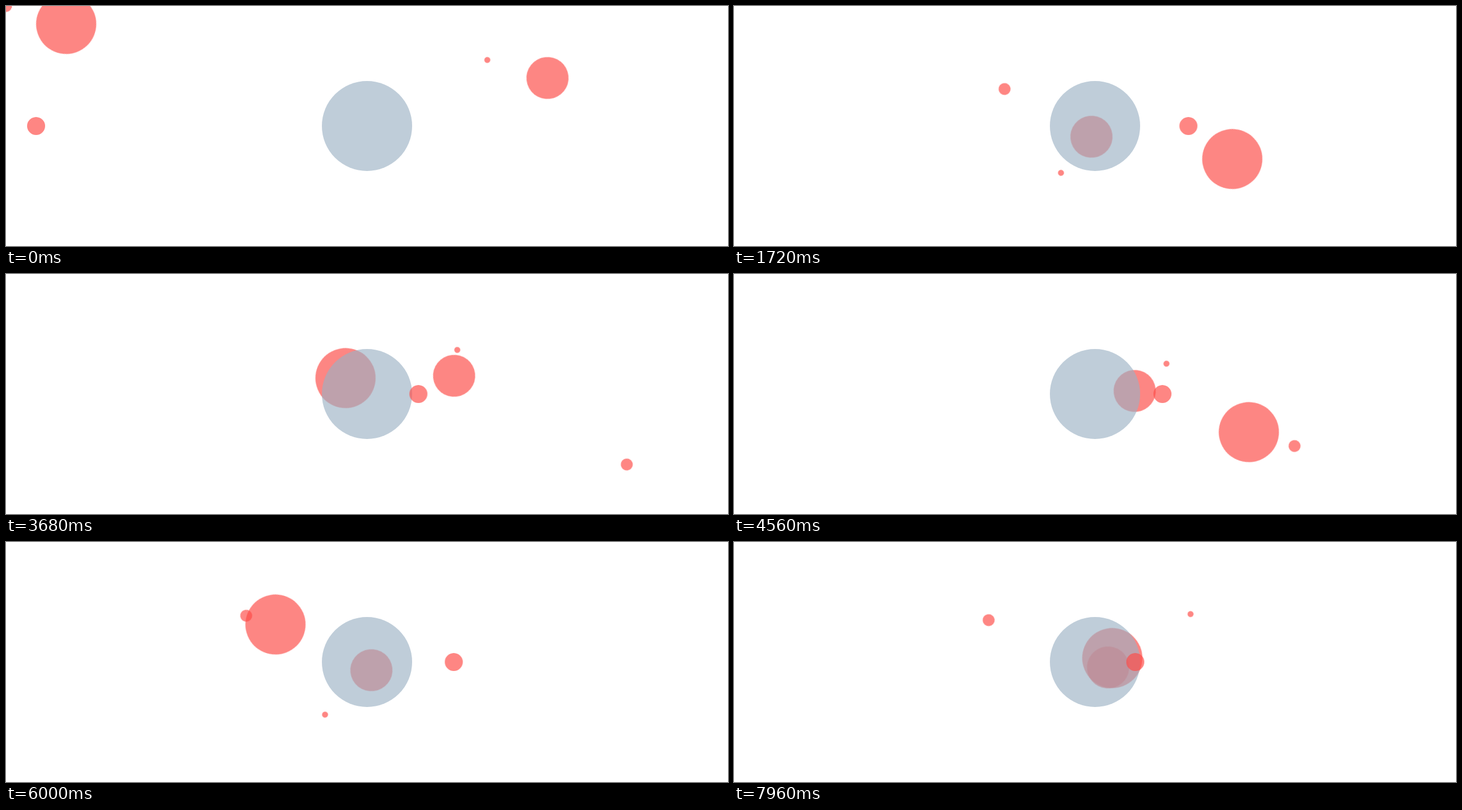
Write an HTML page without scripts that moves like this. It is 1200 by 400 pixels and loops after 8 s.

```html
<!DOCTYPE html>
<html lang="en">
<head>
<meta charset="utf-8">
<title>Attracted bubbles</title>
<style>
  html, body { margin: 0; width: 100%; height: 100%; overflow: hidden; background: #fff; }
  svg { display: block; width: 100vw; height: 100vh; }
  .hub { fill: #9ab1c3; fill-opacity: .635; }
  .ball { fill: #fd4b46; fill-opacity: .67; animation: 8s linear infinite; }
  .a { animation-name: a; }
  .b { animation-name: b; }
  .c { animation-name: c; }
  .d { animation-name: d; }
  .e { animation-name: e; }

  /* Distance from the attractor: speed up to a limit, coast, then swing.
     The curves are parabolas: (.3333, .6667, .6667, 1) slows to a turning
     point, (.3333, 0, .6667, .3333) speeds away from it. */
  @keyframes a {
    0% { transform: translateX(575.67px); animation-timing-function: cubic-bezier(.3333, .0196, .6667, .3529); }
    8% { transform: translateX(371.67px); }
    15.5% { transform: translateX(-3.33px); animation-timing-function: cubic-bezier(.3333, .6667, .6667, 1); }
    23.5833% { transform: translateX(-199.35px); animation-timing-function: cubic-bezier(.3333, 0, .6667, .3333); }
    32% { transform: translateX(13.17px); animation-timing-function: cubic-bezier(.3333, .6667, .6667, 1); }
    39.9167% { transform: translateX(201.19px); animation-timing-function: cubic-bezier(.3333, 0, .6667, .3333); }
    48.5%, 82.5% { transform: translateX(-19.83px); animation-timing-function: cubic-bezier(.3333, .6667, .6667, 1); }
    56.5833%, 90.5833% { transform: translateX(-215.85px); animation-timing-function: cubic-bezier(.3333, 0, .6667, .3333); }
    65%, 99% { transform: translateX(-3.33px); }
    65.5% { transform: translateX(21.67px); animation-timing-function: cubic-bezier(.3333, .6667, .6667, 1); }
    73.5833% { transform: translateX(217.69px); animation-timing-function: cubic-bezier(.3333, 0, .6667, .3333); }
    82% { transform: translateX(5.17px); }
    99.5% { transform: translateX(21.67px); }
    100% { transform: translateX(45.17px); }
  }
  @keyframes b {
    0% { transform: translateX(262.49px); animation-timing-function: cubic-bezier(.3333, .0159, .6667, .3492); }
    10% { transform: translateX(157.49px); }
    18%, 58% { transform: translateX(-2.51px); animation-timing-function: cubic-bezier(.3333, .6667, .6667, 1); }
    27.75%, 67.75% { transform: translateX(-97.57px); animation-timing-function: cubic-bezier(.3333, 0, .6667, .3333); }
    38%, 78% { transform: translateX(7.49px); animation-timing-function: cubic-bezier(.3333, .6667, .6667, 1); }
    47.75%, 87.75% { transform: translateX(102.55px); animation-timing-function: cubic-bezier(.3333, 0, .6667, .3333); }
    98% { transform: translateX(-2.51px); animation-timing-function: cubic-bezier(.3333, .3714, .6667, .7048); }
    100% { transform: translateX(-37.51px); }
  }
  @keyframes c {
    0% { transform: translateX(600px); animation-timing-function: cubic-bezier(.3333, .0238, .6667, .3571); }
    6.5% { transform: translateX(463.5px); }
    18.5%, 45.5%, 72.5% { transform: translateX(-16.5px); animation-timing-function: cubic-bezier(.3333, .6667, .6667, 1); }
    24.9167%, 51.9167%, 78.9167% { transform: translateX(-140.02px); animation-timing-function: cubic-bezier(.3333, 0, .6667, .3333); }
    31.5%, 58.5%, 85.5% { transform: translateX(-10px); }
    32%, 59%, 86% { transform: translateX(10px); animation-timing-function: cubic-bezier(.3333, .6667, .6667, 1); }
    38.4167%, 65.4167%, 92.4167% { transform: translateX(133.52px); animation-timing-function: cubic-bezier(.3333, 0, .6667, .3333); }
    45%, 72%, 99% { transform: translateX(3.5px); }
    99.5% { transform: translateX(-16.5px); }
    100% { transform: translateX(-35px); }
  }
  @keyframes d {
    0% { transform: translateX(186.01px); animation-timing-function: cubic-bezier(.3333, .0133, .6667, .3467); }
    12% { transform: translateX(36.01px); }
    14%, 62% { transform: translateX(-11.99px); animation-timing-function: cubic-bezier(.3333, .6667, .6667, 1); }
    25.75%, 73.75% { transform: translateX(-150.05px); animation-timing-function: cubic-bezier(.3333, 0, .6667, .3333); }
    38%, 86% { transform: translateX(.01px); animation-timing-function: cubic-bezier(.3333, .6667, .6667, 1); }
    49.75%, 97.75% { transform: translateX(138.07px); animation-timing-function: cubic-bezier(.3333, 0, .6667, .3333); }
    100% { transform: translateX(133.01px); }
  }
  @keyframes e {
    0% { transform: translateX(680.07px); animation-timing-function: cubic-bezier(.3333, .0081, .6667, .3415); }
    20% { transform: translateX(270.07px); }
    27% { transform: translateX(-9.93px); animation-timing-function: cubic-bezier(.3333, .6667, .6667, 1); }
    46.75% { transform: translateX(-399.99px); animation-timing-function: cubic-bezier(.3333, 0, .6667, .3333); }
    67% { transform: translateX(10.07px); animation-timing-function: cubic-bezier(.3333, .6667, .6667, 1); }
    86.75% { transform: translateX(400.13px); animation-timing-function: cubic-bezier(.3333, 0, .6667, .3333); }
    100% { transform: translateX(224.57px); }
  }
</style>
</head>
<body>
<svg viewBox="0 0 1200 400">
  <!-- each ball slides along its own line through the attractor -->
  <g transform="translate(650 200) rotate(197.176)"><circle class="ball a" r="50"/></g>
  <g transform="translate(650 200) rotate(-17.745)"><circle class="ball b" r="35"/></g>
  <circle class="hub" cx="600" cy="200" r="75"/>
  <g transform="translate(650 200) rotate(180)"><circle class="ball c" r="15"/></g>
  <g transform="translate(650 200) rotate(-36.254)"><circle class="ball d" r="5"/></g>
  <g transform="translate(650 200) rotate(197.103)"><circle class="ball e" r="10"/></g>
</svg>
</body>
</html>
```
